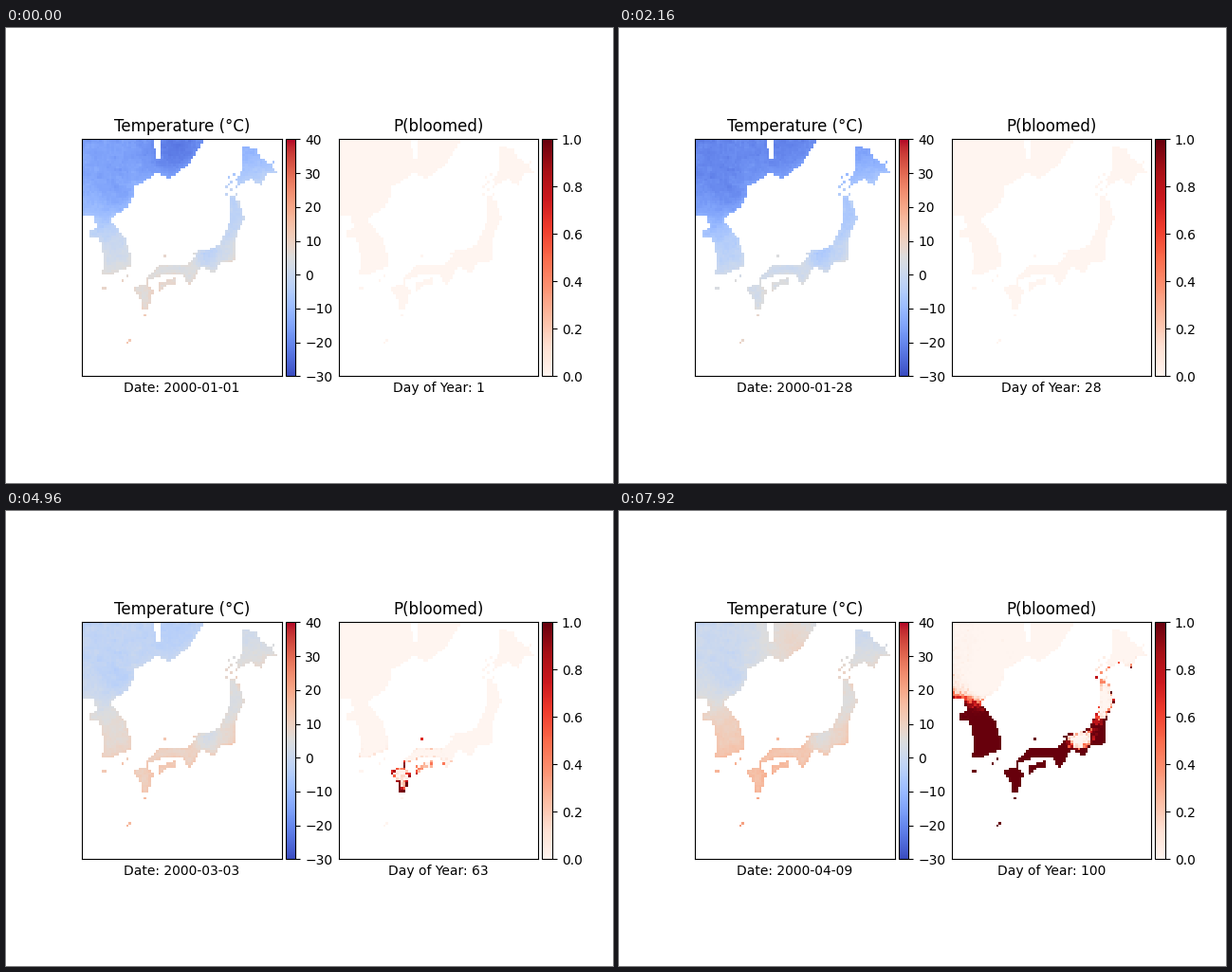
These frames come from a looping animation (640 px wide and 480 px high, 8 s). A matplotlib script:

```python
import numpy as np
import matplotlib.pyplot as plt
from matplotlib.animation import FuncAnimation
from matplotlib.path import Path
from mpl_toolkits.axes_grid1 import make_axes_locatable

NX, NY, CELL = 81, 96, 2.604
LEFT, TOP = 80, 117.4
FRAMES, INTERVAL = 100, 80
rng = np.random.default_rng(7)

# Key points of the coastlines, in stage pixels of the left map.
COASTS = {
    "mainland": [
        (70, 110), (213, 110), (204, 127), (192, 145), (172, 160), (160, 153),
        (136, 168), (134, 179), (130, 188), (114, 199), (111, 203), (126, 223),
        (131, 238), (131, 252), (108, 262), (100, 260), (104, 250), (101, 231),
        (98, 221), (88, 221), (89, 214), (96, 210), (92, 198), (70, 197)],
    "hokkaido": [
        (249, 125), (263, 128), (268, 137), (280, 145), (285, 153), (273, 156),
        (269, 167), (258, 160), (245, 166), (245, 156), (250, 148)],
    "honshu": [
        (236, 180), (246, 183), (252, 202), (243, 217), (241, 246), (227, 248),
        (219, 258), (205, 252), (200, 264), (192, 271), (187, 260), (168, 260),
        (147, 268), (147, 264), (163, 249), (190, 250), (200, 240), (195, 238),
        (204, 235), (212, 235), (225, 228), (234, 209), (237, 197)],
    "shikoku": [(159, 270), (179, 264), (178, 270), (169, 271), (162, 279)],
    "kyushu": [(134, 275), (149, 269), (155, 278), (151, 295), (144, 299),
               (141, 286)],
}
LAKE = [(155, 110), (163, 110), (163, 137), (158, 137), (158, 128), (155, 128)]
ISLETS = [(101, 276), (105, 275), (127, 262), (124, 266), (168, 241),
          (147, 304), (132, 329), (129, 332), (283, 141)]

# Cold highlands: x, y, reach in pixels, cooling in degrees.
HIGHLANDS = [(214, 240, 11, 7), (236, 204, 16, 6), (118, 180, 15, 4)]

# Weather: day, southern level, continental level, northern anomaly.
WEATHER = np.array([
    (1, 6, -15, -8), (19, 2, -21, -4), (39, 1, -19, 0), (49, 3, -14, -2),
    (63, 10, -1, -3), (84, 7, -3, -2), (100, 13, -1, 8)])


def cell_of(point):
    return int((point[1] - TOP) / CELL), int((point[0] - LEFT) / CELL)


def box_blur(field):
    padded = np.pad(field, 1, mode="edge")
    return sum(padded[r:r + NY, c:c + NX] for r in range(3) for c in range(3)) / 9


def bump(x, y, reach):
    return np.exp(-((X - x) ** 2 + (Y - y) ** 2) / (2 * reach ** 2))


def inside(points):
    return Path(points + points[:1]).contains_points(centres).reshape(NY, NX)


X, Y = np.meshgrid(LEFT + (np.arange(NX) + 0.5) * CELL,
                   TOP + (np.arange(NY) + 0.5) * CELL)
centres = np.column_stack([X.ravel(), Y.ravel()])

land = np.any([inside(coast) for coast in COASTS.values()], axis=0)
land &= ~inside(LAKE)
islets = np.zeros_like(land)
strait = rng.uniform((233, 154), (244, 182), size=(14, 2))
for spot in ISLETS + list(strait):
    islets[cell_of(spot)] = True
islets &= ~land
land |= islets

continental = 1 / (1 + np.exp((Y + 0.3 * (X - 90) - 210) / 22))
mild = (1 - continental) * (1 - box_blur(land.astype(float)))
highland = sum(cool * bump(x, y, reach) for x, y, reach, cool in HIGHLANDS)
north = bump(182, 132, 24)
rough = rng.normal(size=(NY, NX))
relief = (0.4 * rough + 1.5 * box_blur(rng.normal(size=(NY, NX)))
          + 5 * mild - highland + 0.05 * (Y - 260) * (Y > 260))

# Cold, high and inland places bloom late, and so do the small islands.
bloom_day = (75 + 36 * continental + 0.25 * (X - 100).clip(0) * continental
             + 5 * highland - 20 * mild - 0.35 * (Y - 260).clip(0)
             + rough * (1.5 + 2 * (X > 133)))
bloom_day = np.where(islets & (Y > 250), 90, bloom_day.clip(54))


def temperature(day):
    south, continent, anomaly = (
        np.interp(day, WEATHER[:, 0], level) for level in WEATHER.T[1:])
    front = np.sin(1.1 * day - X / 60)
    return (south + (continent - south) * continental + anomaly * north
            + relief + front)


def bloomed(day):
    return 1 / (1 + np.exp(((bloom_day - day) / 2).clip(-50, 50)))


def on_land(field):
    return np.ma.array(field, mask=~land)


def make_map(ax, title, cmap, low, high):
    image = ax.imshow(on_land(np.zeros((NY, NX))), cmap=cmap, vmin=low,
                      vmax=high, interpolation="nearest")
    ax.set(title=title, xticks=[], yticks=[])
    cax = make_axes_locatable(ax).append_axes("right", size="5%", pad=0.04)
    fig.colorbar(image, cax=cax)
    return image


plt.rcParams["font.family"] = "DejaVu Sans"
fig, (temp_ax, bloom_ax) = plt.subplots(1, 2, figsize=(6.4, 4.8), dpi=100)
temp_map = make_map(temp_ax, "Temperature (°C)", "coolwarm", -30, 40)
bloom_map = make_map(bloom_ax, "P(bloomed)", "Reds", 0, 1)


def update(frame):
    day = frame + 1
    temp_map.set_data(on_land(temperature(day)))
    bloom_map.set_data(on_land(bloomed(day)))
    temp_ax.set_xlabel(f"Date: {np.datetime64('2000-01-01') + frame}")
    bloom_ax.set_xlabel(f"Day of Year: {day}")
    return temp_map, bloom_map


animation = FuncAnimation(fig, update, frames=FRAMES, interval=INTERVAL,
                          repeat=True, repeat_delay=0)
plt.show()
```
